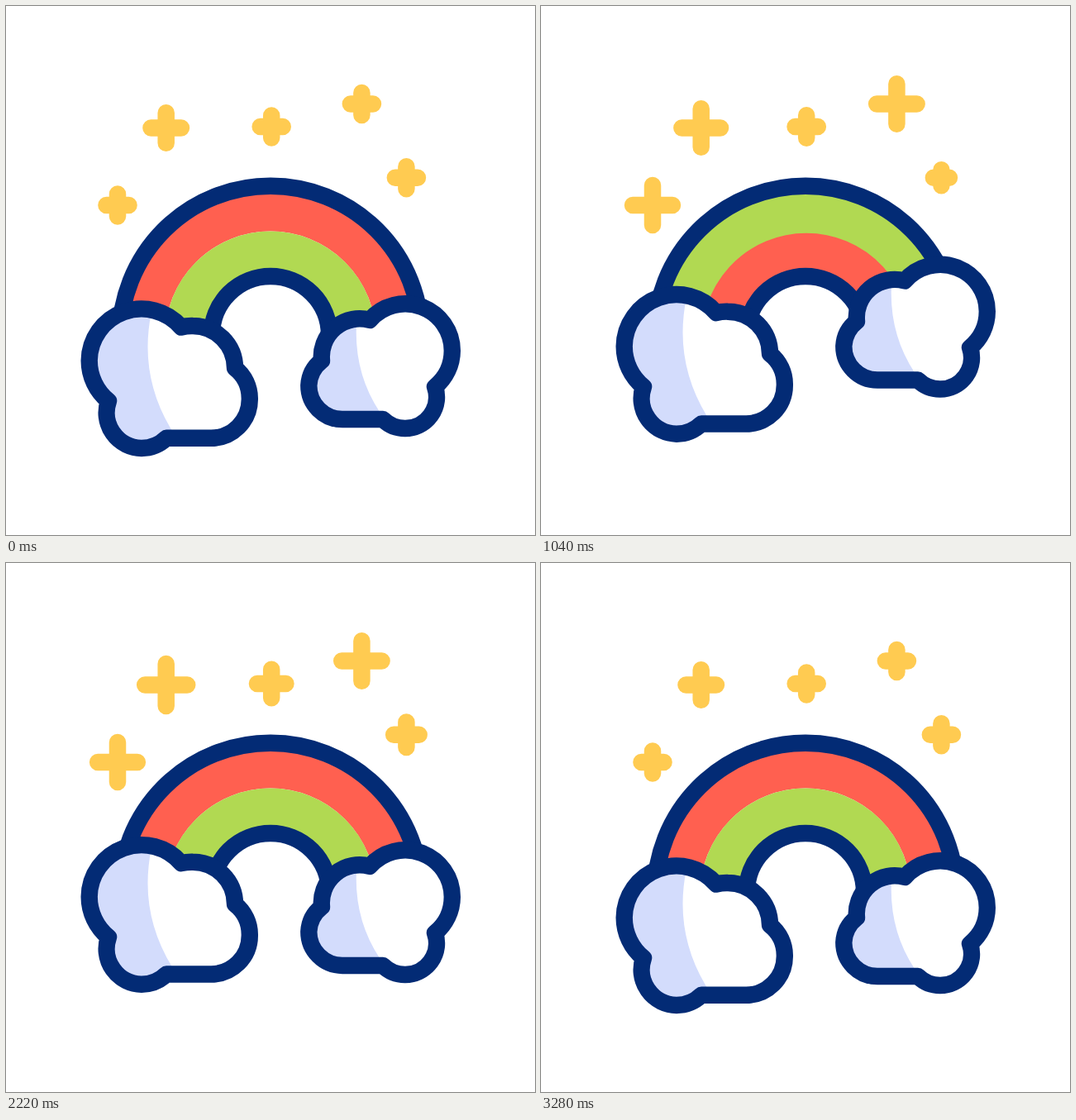
Write an HTML page that moves like this. It is 640x640 px and loops after 3600 ms.

```html
<!DOCTYPE html>
<html lang="en">
<head>
<meta charset="utf-8">
<title>Rainbow</title>
<style>
html, body { margin: 0; height: 100%; overflow: hidden; background: #fff; }
svg { display: block; width: 100vw; height: 100vh; }
.line { fill: none; stroke: #032b75; stroke-width: 20.4; stroke-linejoin: round; }
.red { fill: none; stroke: #ff6050; }
.green { fill: none; stroke: #b1d952; }
.cap { stroke-linecap: round; }
.shade { fill: #d3dcfc; }
#stars { fill: none; stroke: #ffcb51; stroke-width: 20.5; stroke-linecap: round; }
</style>
</head>
<body>
<svg viewBox="0 0 640 640">
  <defs>
    <path id="leftShape" d="M124 478A63.300 63.300 0 0 1 100.700 429A63.300 63.300 0 0 1 212 388.500A51 51 0 0 1 226 387A51 51 0 0 1 277 438A47 47 0 0 1 294.800 476A46.800 46.800 0 0 1 248 522.800H194A43 43 0 0 1 164 535A43 43 0 0 1 124 478Z"/>
    <path id="rightShape" d="M382 429A46 46 0 0 1 440 380A56.800 56.800 0 0 1 539.800 417A56.800 56.800 0 0 1 519 460.800A38 38 0 0 1 483 511A38 38 0 0 1 456 500H407A40.800 40.800 0 0 1 366.300 459A40.800 40.800 0 0 1 382 429Z"/>
    <clipPath id="leftClip"><use href="#leftShape"/></clipPath>
    <clipPath id="rightClip"><use href="#rightShape"/></clipPath>
  </defs>
  <g id="stars"></g>
  <path class="red" stroke-width="47" d="M169 400a151 151 0 0 1 302 0"/>
  <path class="green" stroke-width="51" d="M218 400a102 102 0 0 1 204 0"/>
  <path class="red cap" id="inner" stroke-width="47"/>
  <path class="green cap" id="outer" stroke-width="48"/>
  <path class="line" d="M138 399.700a182 182 0 0 1 364 0M249 398a71 71 0 0 1 142 0"/>
  <g id="left">
    <use href="#leftShape" fill="#fff"/>
    <path class="shade" clip-path="url(#leftClip)" d="M176 370Q160 447 201 514V540H80V340H176Z"/>
    <use href="#leftShape" class="line"/>
  </g>
  <g id="right">
    <use href="#rightShape" fill="#fff"/>
    <path class="shade" clip-path="url(#rightClip)" d="M424 385Q421 444 452 491V520H340V370H424Z"/>
    <use href="#rightShape" class="line"/>
  </g>
</svg>
<script>
const LOOP = 3600;
const $ = id => document.getElementById(id);

// Eased value at t through [time, value] keys
function tween(t, keys) {
  if (t <= keys[0][0]) return keys[0][1];
  for (let i = 1; i < keys.length; i++) {
    const [t0, a] = keys[i - 1], [t1, b] = keys[i];
    if (t < t1) {
      const u = (t - t0) / (t1 - t0);
      return a + (b - a) * u * u * (3 - 2 * u);
    }
  }
  return keys[keys.length - 1][1];
}

// x, y, start, reach at rest, longest, shortest
const stars = [
  [193.7, 147.5, 365, 28.5, 41, 13],
  [321.2, 146, 295, 23.8, 34.5, 11],
  [430.4, 118.5, 540, 23.8, 34.5, 11],
  [484.4, 207.7, 232, 23.8, 34.5, 11],
  [135, 241, 512, 23.8, 34.5, 11]
].map(([x, y, start, rest, long, short]) => {
  const el = document.createElementNS("http://www.w3.org/2000/svg", "path");
  $("stars").append(el);
  const keys = [[0, rest], [495, long], [1032, short], [1660, long], [2100, rest]]
    .map(([t, v]) => [t + start, v]);
  return { el, x, y, keys };
});

function drawStar({ el, x, y, keys }, t) {
  const h = tween(t, keys) - 10.25;
  el.setAttribute("d", `M${x - h} ${y}h${2 * h}M${x} ${y - h}v${2 * h}`);
}

// Band growing from the left foot, then drawing back
function drawBand(id, r, t, grow, shrink) {
  const p = tween(t, [[grow, 0], [grow + 800, 1], [shrink, 1], [shrink + 800, 0]]);
  const at = deg => {
    const a = deg * Math.PI / 180;
    return `${321 - r * Math.cos(a)} ${401 - r * Math.sin(a)}`;
  };
  const sweep = 190 * p;
  $(id).setAttribute("d", p > 0
    ? `M${at(-5)}A${r} ${r} 0 ${sweep > 180 ? 1 : 0} 1 ${at(sweep - 5)}` : "");
}

function lift(id, t, start, height) {
  const y = tween(t, [[start, 0], [start + 1110, -height], [start + 2800, 0]]);
  $(id).setAttribute("transform", `translate(0 ${y})`);
}

function draw(now) {
  const t = now % LOOP;
  stars.forEach(s => drawStar(s, t));
  drawBand("inner", 103.5, t, 220, 1280);
  drawBand("outer", 150.3, t, 0, 1480);
  lift("left", t, 500, 36);
  lift("right", t, 0, 48);
  requestAnimationFrame(draw);
}
draw(0);
</script>
</body>
</html>
```
